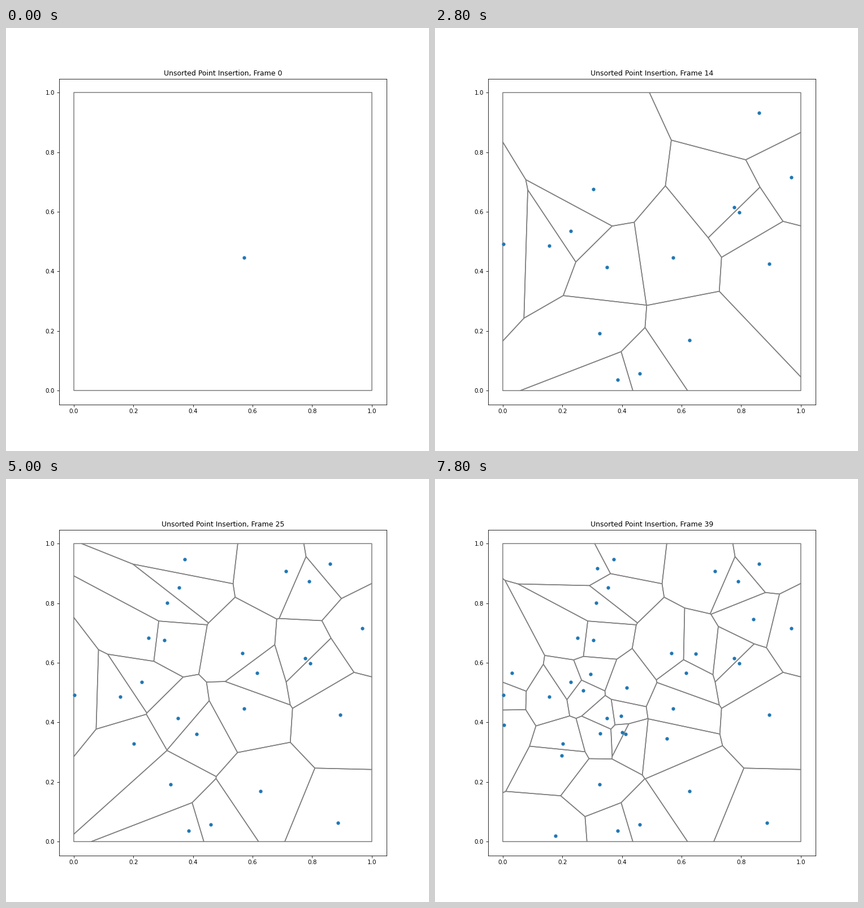
Animation of 748 by 748 pixels, one loop 8000 ms. Source, as a matplotlib script:

```python
import numpy as np
import matplotlib.pyplot as plt
from matplotlib.animation import FuncAnimation
from matplotlib.collections import PolyCollection

STAGE = 748
UNIT = 527.0                 # pixels per data unit
ORIGIN = (119.85, 641.26)    # stage position of (0, 0)
FRAMES, INTERVAL = 40, 200

# Sites in stage pixels, in order of insertion
SITES = np.array([
    (421.4, 405.7), (538.1, 326.2), (240.4, 358.7), (120.8, 382.2),
    (630.0, 264.4), (304.0, 423.0), (322.6, 622.5), (591.2, 417.0),
    (573.2, 150.0), (449.8, 551.6), (529.1, 317.0), (201.5, 384.6),
    (362.3, 610.6), (280.1, 284.8), (290.6, 539.6), (586.6, 607.6),
    (226.1, 467.8), (418.4, 308.5), (285.2, 219.5), (494.6, 163.4),
    (316.0, 142.5), (444.0, 343.0), (252.3, 281.4), (337.3, 451.5),
    (306.2, 192.5), (536.0, 181.4), (121.6, 434.8), (410.1, 459.0),
    (135.8, 343.0), (286.6, 158.0), (339.1, 369.2), (461.1, 309.4),
    (224.0, 488.8), (275.0, 345.2), (328.6, 419.4), (261.5, 374.5),
    (292.0, 450.0), (562.6, 248.0), (212.6, 630.9), (330.8, 448.2),
])
POINTS = (SITES - ORIGIN) / (UNIT, -UNIT)
SQUARE = [np.array(c, float) for c in ((0, 0), (1, 0), (1, 1), (0, 1))]


def clip(poly, normal, offset):
    """Keep the part of a convex polygon where normal . p <= offset."""
    kept = []
    for a, b in zip(poly, poly[1:] + poly[:1]):
        da, db = normal @ a - offset, normal @ b - offset
        if da <= 0:
            kept.append(a)
        if da * db < 0:
            kept.append(a + (b - a) * da / (da - db))
    return kept


def cell(i, points):
    """Voronoi cell of point i inside the unit square."""
    poly, p = SQUARE, points[i]
    for j, q in enumerate(points):
        if j != i:
            poly = clip(poly, q - p, (q @ q - p @ p) / 2)
    return poly


fig = plt.figure(figsize=(10, 10), dpi=STAGE / 10, facecolor="white")
ax = fig.add_subplot()
half = 0.77 * STAGE / UNIT / 2
ax.set_xlim(-0.05, 1.05)
ax.set_ylim(0.5 - half, 0.5 + half)

cells = PolyCollection([], facecolors="none", edgecolors="gray",
                       linewidths=1.5, zorder=2)
ax.add_collection(cells, autolim=False)
dots, = ax.plot([], [], "o", color="C0", markersize=5, zorder=3)
title = ax.set_title("")


def update(frame):
    points = POINTS[:frame + 1]
    cells.set_verts([cell(i, points) for i in range(len(points))])
    dots.set_data(points[:, 0], points[:, 1])
    title.set_text(f"Unsorted Point Insertion, Frame {frame}")
    return cells, dots, title


anim = FuncAnimation(fig, update, frames=FRAMES, interval=INTERVAL,
                     repeat=True, repeat_delay=0, blit=False)
plt.show()
```
